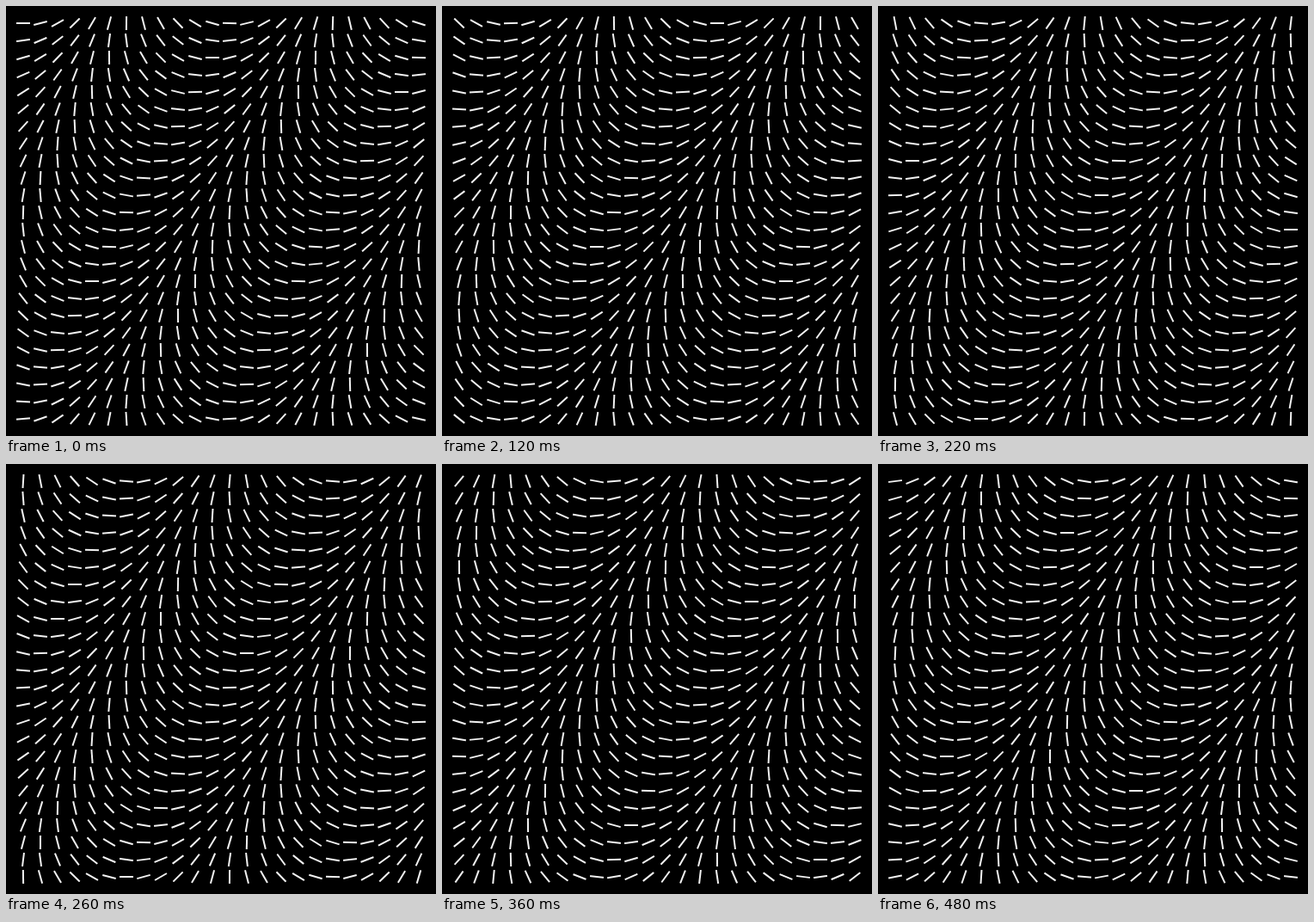
Write an HTML page that moves like this. It is 500 by 500 pixels and loops after 0.5 s.

```html
<!DOCTYPE html>
<html lang="en">
<head>
<meta charset="utf-8">
<title>Turning needles</title>
<style>
  html, body { margin: 0; height: 100%; overflow: hidden; background: #000; }
  svg { display: block; width: 100vw; height: 100vh; }
  line {
    stroke: #f2f2f2;
    stroke-width: 2;
    animation: turn 500ms steps(25) infinite;
  }
  @keyframes turn { to { transform: rotate(180deg); } }
</style>
</head>
<body>
<svg id="field" viewBox="0 0 500 500"></svg>
<script>
  const COUNT = 24, GAP = 20, HALF = 8;
  const COL_TURN = 14.9, ROW_TURN = 8.02; // degrees between neighbours

  const needle = (col, row) => {
    const x = (col + 1) * GAP, y = (row + 1) * GAP;
    const angle = -(col * COL_TURN + row * ROW_TURN);
    return `<g transform="translate(${x} ${y}) rotate(${angle})"><line x1="${-HALF}" x2="${HALF}"/></g>`;
  };

  let marks = "";
  for (let row = 0; row < COUNT; row++)
    for (let col = 0; col < COUNT; col++) marks += needle(col, row);
  document.getElementById("field").innerHTML = marks;
</script>
</body>
</html>
```
